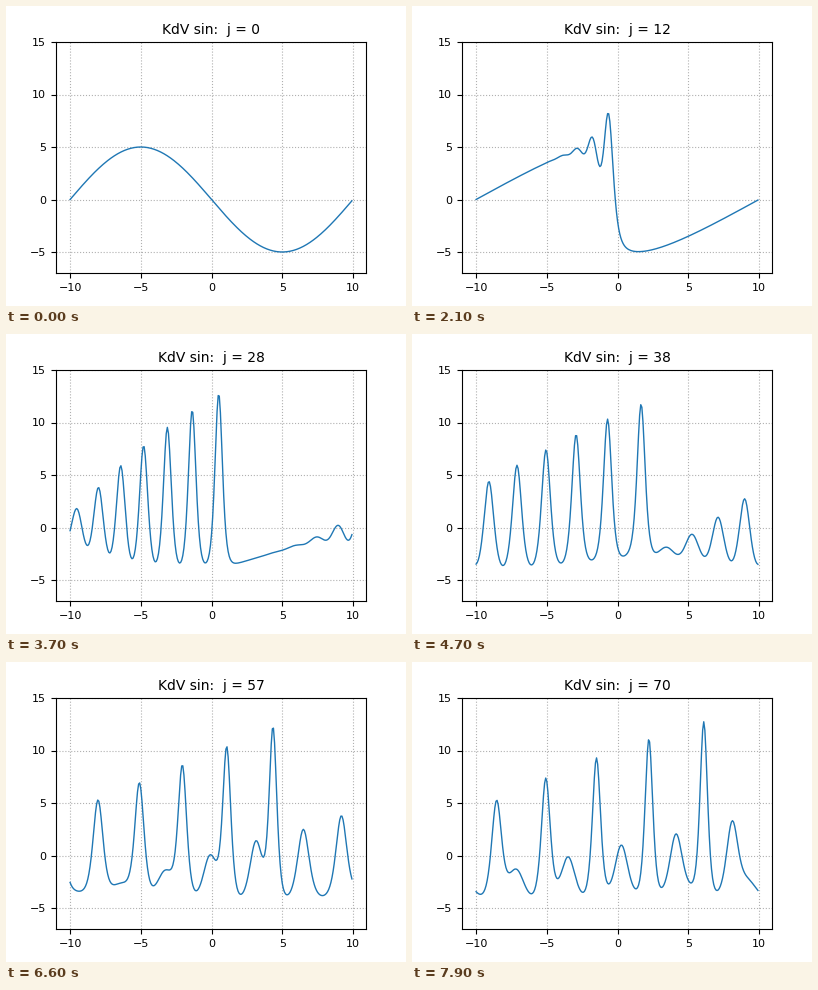
A matplotlib script that plays this animation: 400 by 300 pixels, repeating every 8 s.

```python
import numpy as np
import matplotlib.pyplot as plt
from matplotlib.animation import FuncAnimation

# KdV equation u_t + 6 u u_x + u_xxx = 0 on a periodic interval,
# integrated in Fourier space with an integrating factor and RK4.
N = 256
HALF = 10.0
DT = 0.01          # model time per shown step
SUBSTEPS = 200
STEPS = 70
HOLD = 9           # extra frames on the initial state

x = -HALF + 2 * HALF * np.arange(N) / N
k = np.pi / HALF * np.arange(N // 2 + 1)
k[-1] = 0.0

h = DT / SUBSTEPS
half_shift = np.exp(0.5j * k**3 * h)
full_shift = half_shift**2


def slope(v):
    return -3j * k * np.fft.rfft(np.fft.irfft(v, N) ** 2)


def advance(v):
    for _ in range(SUBSTEPS):
        a = h * slope(v)
        b = h * slope(half_shift * (v + a / 2))
        c = h * slope(half_shift * v + b / 2)
        d = h * slope(full_shift * v + half_shift * c)
        v = full_shift * v + (full_shift * a + 2 * half_shift * (b + c) + d) / 6
    return v


def solve():
    u0 = -5 * np.sin(np.pi * x / HALF)
    v = np.fft.rfft(u0)
    states = [u0]
    for _ in range(STEPS):
        v = advance(v)
        states.append(np.fft.irfft(v, N))
    return states


states = solve()

fig, ax = plt.subplots(figsize=(4, 3), dpi=100)
line, = ax.plot(x, states[0], lw=1)
ax.set_ylim(-7, 15)
ax.set_xticks(range(-10, 11, 5))
ax.set_yticks(range(-5, 16, 5))
ax.tick_params(labelsize=8)
ax.grid(linestyle=":")
title = ax.set_title("", fontsize=10)


def draw(frame):
    j = max(0, frame - HOLD)
    line.set_ydata(states[j])
    title.set_text(f"KdV sin:  j = {j}")
    return line, title


anim = FuncAnimation(fig, draw, frames=STEPS + HOLD + 1, interval=100,
                     repeat=True, repeat_delay=0, blit=False)
plt.show()
```
